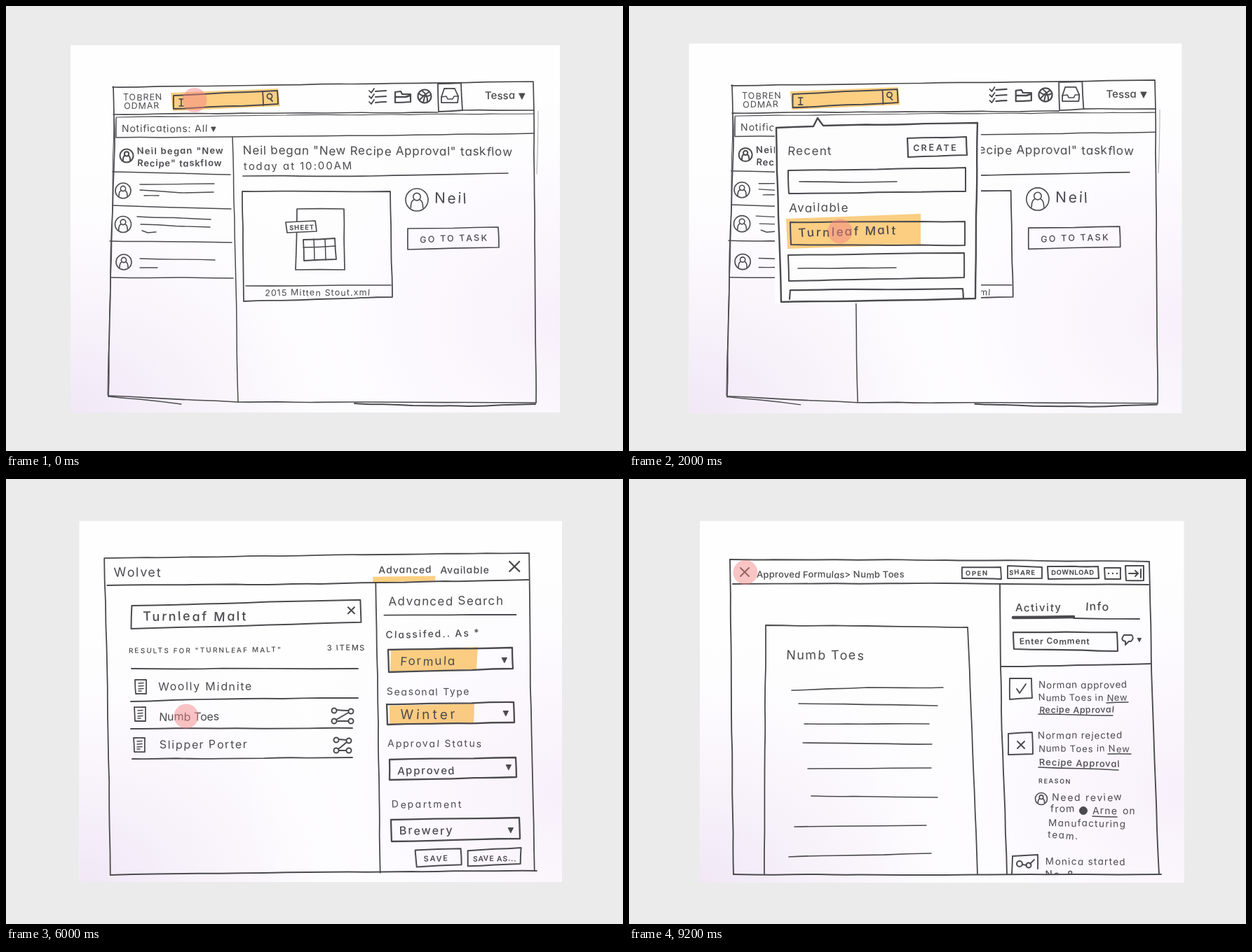
Recreate the animation shown at these times as an HTML page. Size 880 by 636 pixels, loop 10 s.

```html
<!DOCTYPE html>
<html lang="en">
<head>
<meta charset="utf-8">
<title>Paper prototype walkthrough</title>
<style>
  html, body { margin: 0; width: 100%; height: 100%; overflow: hidden; background: #ebebeb; }
  svg { display: block; width: 100vw; height: 100vh; }
  text { font-family: Inter, Lato, sans-serif; font-feature-settings: "cv11"; white-space: pre; }
  path { stroke-linecap: round; stroke-linejoin: round; }
</style>
</head>
<body>
<svg id="stage" viewBox="0 0 880 636" xmlns="http://www.w3.org/2000/svg"></svg>
<script>
const INK = '#4b4a4e';
const MARKER = '#fdd083';
const SCENE_MS = 2000;

let seed = 7;
const random = () => (seed = (seed * 16807) % 2147483647) / 2147483647;
const jitter = amount => (random() * 2 - 1) * amount;
const round = n => +n.toFixed(1);

// Hand-drawn stroke through "x y x y ..." with a slight tremble.
function pen(coords, width = 1.6, color = INK, fill = 'none') {
  const c = coords.split(' ').map(Number);
  let d = `M${c[0]} ${c[1]}`;
  for (let i = 2; i < c.length; i += 2) {
    const [x0, y0, x1, y1] = c.slice(i - 2, i + 2);
    const length = Math.hypot(x1 - x0, y1 - y0);
    const parts = Math.ceil(length / 70);
    const shake = Math.min(0.8, length / 50);
    for (let k = 1; k <= parts; k++) {
      const at = (f, j) => `${round(x0 + (x1 - x0) * f + jitter(j))} ${round(y0 + (y1 - y0) * f + jitter(j))}`;
      d += `Q${at((k - 0.5) / parts, shake)} ${at(k / parts, k < parts ? shake * 0.6 : 0)}`;
    }
  }
  return `<path d="${d}" fill="${fill}" stroke="${color}" stroke-width="${width}"/>`;
}

const box = (corners, width = 1.8, fill) =>
  pen(corners + ' ' + corners.split(' ').slice(0, 2).join(' '), width, INK, fill);

const curve = (d, width = 1.6, fill = 'none') =>
  `<path d="${d}" fill="${fill}" stroke="${INK}" stroke-width="${width}"/>`;

const ring = (x, y, r, width = 1.6, fill = 'none') =>
  `<circle cx="${x}" cy="${y}" r="${r}" fill="${fill}" stroke="${INK}" stroke-width="${width}"/>`;

// Lettering with baseline start x, y; each glyph tilts a little.
function write(x, y, words, size, spacing = 0, weight = 400, tilt = 0) {
  const tilts = [...words].map(() => round(jitter(4))).join(' ');
  const shifts = [];
  let last = 0;
  for (const _ of words) {
    const next = round(jitter(0.5));
    shifts.push(round(next - last));
    last = next;
  }
  return `<text x="${x}" y="${y}" dy="${shifts.join(' ')}" rotate="${tilts}" font-size="${size}" letter-spacing="${spacing}"
    font-weight="${weight}" fill="${INK}" transform="rotate(${tilt} ${x} ${y})">${words}</text>`;
}

const marker = points =>
  `<polygon points="${points}" fill="${MARKER}" style="mix-blend-mode:multiply"/>`;

const touch = (x, y) => `<circle cx="${x}" cy="${y}" r="17.5" fill="#f28383" opacity=".47"/>`;

const cross = (x, y, r, width = 2) =>
  pen(`${x - r} ${y - r} ${x + r} ${y + r}`, width) + pen(`${x + r} ${y - r} ${x - r} ${y + r}`, width);

const caret = (x, y, s = 4) => curve(`M${x - s} ${y - s}h${2 * s}l${-s} ${2 * s}z`, 1, INK);

const person = (x, y, r, width = 1.6) => {
  const k = r / 11;
  return ring(x, y, r, width) + ring(x, y - 3 * k, 3.6 * k, width) +
    curve(`M${x - 6 * k} ${y + 8 * k}q0 ${-7 * k} ${3 * k} ${-8 * k}m${6 * k} 0q${3 * k} ${k} ${3 * k} ${8 * k}`, width);
};

const page = (x, y) =>
  box(`${x - 8} ${y - 10} ${x + 8} ${y - 10} ${x + 8} ${y + 10} ${x - 7} ${y + 10}`, 1.8) +
  [-5, -1, 3].map(dy => pen(`${x - 3} ${y + dy} ${x + 4} ${y + dy - 0.5}`, 1.5)).join('') +
  pen(`${x - 3} ${y + 6} ${x + 1} ${y + 6}`, 1.5);

const flow = (x, y, w = 12) =>
  pen(`${x - w + 3} ${y - 8} ${x + w - 3} ${y - 7}`, 2) +
  pen(`${x + w - 2} ${y - 5} ${x - w + 3} ${y + 6}`, 2) +
  pen(`${x - w + 3} ${y + 8} ${x + w - 3} ${y + 8}`, 2) +
  [[-w, -7], [w, -6], [-w, 8], [w, 8]].map(([dx, dy]) => ring(x + dx, y + dy, 3.5, 2, '#fcfbfe')).join('');

const paper = (x0, y0, x1, y1) => {
  const rect = fill => `<rect x="${x0}" y="${y0}" width="${x1 - x0}" height="${y1 - y0}" fill="${fill}"/>`;
  return rect('#fefefe') + rect('url(#lavender)') + rect('url(#blush)');
};

function headerIcons() {
  const checks = [121, 129, 137].map(y =>
    pen(`518 ${y} 521 ${y + 3} 525 ${y - 3}`, 1.8) + pen(`527 ${y + 1} 542 ${y}`, 2.2)).join('');
  const folder = box('555 138 555 123 563 122 565 126 577 126 577 137', 2.2) + pen('556 130 570 130 576 128', 2.4);
  const globe = ring(597, 129, 9.5, 2.2) +
    curve('M589 125q8 7 17 2M593 121q9 6 8 16M590 134q6 -7 13 -11M597 130l-2 8', 2);
  const tray = box('616 111 649 110 651 149 617 151', 1.8) +
    box('621 130 625 118 640 118 645 129 644 138 621 138', 1.8) + pen('621 130 628 129 630 133 637 133 639 129 645 129', 1.6);
  return checks + folder + globe + tray;
}

function inbox() {
  const frame = pen('152 116 752 108 753 152 754 330 756 567', 1.7) +
    pen('153 115 155 200 149 380 146 558', 1.7) + pen('154 160 151 330 145 556', 1) +
    pen('146 557 330 566 500 566 756 567', 1.6) + pen('146 558 190 562 250 569', 1.3) +
    pen('497 568 580 571 660 572 755 569', 2) + pen('759 150 757 240', 0.8, '#999') +
    pen('153 155 400 153 616 152', 1.6) + pen('651 149 753 149', 1.6) +
    pen('157 160 157 188 420 186 753 182', 1.5) + pen('157 159 400 156 752 154', 1.1);
  const header = write(167, 135, 'TOBREN', 12.5, 1, 400, -1) + write(168, 147, 'ODMAR', 12.5, 1) +
    marker('235,124 388,118 391,143 238,150') +
    box('239 128 387 121 388 140 239 147', 2) + pen('366 122 367 142', 1.8) +
    ring(376, 129, 3.6, 1.7) + pen('377 133 380 136', 1.8) +
    pen('247 133 253 133', 1.7) + pen('250 133 250 143', 1.7) + pen('247 143 253 143', 1.7) +
    headerIcons() + write(683, 133, 'Tessa', 15, 0, 500) + caret(736, 129);
  const scribbles = ['191 255 297 254', '191 263 250 267 296 266', '197 271 218 271',
    '187 301 292 305', '192 312 291 316', '194 321 202 324 214 323',
    '191 361 298 363', '191 374 216 374'].map(s => pen(s, 1.4)).join('');
  const dividers = ['152 237 320 241', '152 285 321 290', '148 336 322 338', '150 388 324 389', '323 187 327 360 331 566']
    .map(s => pen(s, 1.5)).join('');
  const sidebar = write(165, 180, 'Notifications: All', 14, 0.8) + caret(296, 176, 3) +
    write(187, 212, 'Neil began "New', 13, 1.2, 600, -0.5) + write(187, 229, 'Recipe" taskflow', 13, 0.9, 600) +
    person(172, 214, 9.5, 2) + person(167, 264, 11) + person(167, 312, 11.5) + person(168, 366, 11) +
    scribbles + dividers;
  const detail = write(338, 212, 'Neil began "New Recipe Approval" taskflow', 17, 0.75, 400, 0.3) +
    write(339, 234, 'today at 10:00AM', 15, 1.9) + pen('338 243 520 243 716 239', 1.7) +
    box('337 265 548 265 551 416 339 422', 1.8) + pen('342 400 549 399', 1.6) +
    box('415 290 482 290 483 377 413 377', 1.7) +
    box('399 309 441 307 443 322 401 324', 1.7, '#fdfdfe') + write(404, 320, 'SHEET', 9.5, 1, 700) +
    box('424 334 469 332 471 362 425 364', 1.8) + pen('424 345 470 343', 1.5) +
    pen('439 333 440 363', 1.5) + pen('455 333 456 363', 1.5) +
    write(369, 414, '2015 Mitten Stout.xml', 12.5, 1.1) +
    person(586, 277, 16) + write(611, 282, 'Neil', 21, 2.5) +
    box('573 318 702 316 703 345 573 348', 1.7) + write(590, 338, 'GO TO TASK', 12.5, 2.3, 500, -1.5);
  return paper(92, 56, 790, 581) + frame + header + sidebar + detail;
}

function popup() {
  return `<path d="M204 180L210 161H502V425H208V180Z" fill="#fdfdfe"/>` +
    pen('210 174 263 172 269 160 277 171 400 169 497 167 495 300 494 418 350 421 217 423 213 300 210 174', 2.4) +
    write(226, 213, 'Recent', 17, 1.4) +
    box('397 189 481 187 482 213 398 216', 2.2) + write(405, 207, 'CREATE', 12.5, 2.6, 600) +
    box('227 235 480 231 480 265 228 268', 2) + pen('243 251 330 252 382 251', 1.6) +
    write(228, 294, 'Available', 17, 1.4) +
    marker('224,304 416,297 416,341 226,347') +
    box('230 309 479 308 479 342 231 341', 2) + write(242, 330, 'Turnleaf Malt', 17, 2.4, 500, -1.5) +
    box('227 356 478 353 478 388 228 393', 2) + pen('241 375 381 374', 1.6) +
    pen('229 419 230 406 476 404 477 418', 2.2);
}

function searchShell() {
  return pen('142 113 450 110 748 108 749 300 754 562', 1.8) + pen('142 114 146 300 149 565', 1.8) +
    pen('149 566 400 563 757 562', 2) + pen('146 152 450 151 747 146', 2) + pen('529 150 532 350 534 564', 1.8) +
    write(156, 140, 'Wolvet', 18, 1.6) +
    write(533, 136, 'Advanced', 14, 1, 500) + write(621, 137, 'Available', 14, 1, 500) + cross(727, 127, 7, 2.3) +
    marker('525,141 614,140 614,147 525,149') +
    box('181 181 507 174 508 206 180 214', 2) + write(197, 203, 'Turnleaf Malt', 18, 2.6, 500) + cross(494, 189, 4.5) +
    write(547, 182, 'Advanced Search', 17, 1.4) + pen('541 196 729 196', 1.8) +
    write(543, 229, 'Classifed.. As *', 14, 2, 500, -1) +
    box('584 532 649 530 650 553 586 556', 2) + write(596, 548, 'SAVE', 11, 1.8, 600) +
    box('659 533 735 529 734 552 659 555', 2) + write(666, 548, 'SAVE AS...', 10.5, 0.8, 600);
}

const select = (corners, caretX, caretY) => box(corners, 2.3) + caret(caretX, caretY, 3.5);

function allResults() {
  const rows = [
    [218, 295, 'Tinpan Ale', 2.2],
    [218, 335, 'Narrow Plank Rye', 0.7],
    [218, 379, 'Gooseplum Rise Stout', 0.6],
    [218, 420, 'Barrowmoots', 0.8],
    [222, 468, 'Thimble Turnip Malt', 1.8],
    [219, 512, 'Lantern Smokemalt', 1.4]
  ];
  const rules = ['193 269 499 269', '179 308 494 308', '180 347 495 350', '175 391 498 391',
    '180 433 493 433', '180 479 494 480', '176 526 340 523 496 524'];
  return paper(106, 60, 794, 576) + searchShell() +
    write(187, 247, 'RESULTS FOR', 11, 2.4, 500) + write(300, 245, '"Turnleaf Malt"', 14, 2.4) +
    write(456, 244, '1000', 11, 1.2, 600) + write(457, 257, 'items', 12.5, 1.8, 500) +
    rules.map(r => pen(r, 1.9)).join('') +
    rows.map(([x, y, name, gap]) => page(197, y - 6) + write(x, y, name, 16, gap)).join('') +
    flow(472, 333) + flow(471, 460, 13) + flow(471, 506, 10) +
    select('546 249 722 244 723 275 547 281', 712, 262) + write(558, 270, 'Select...', 16, 2.2, 500) +
    touch(599, 266);
}

function filteredResults() {
  const rules = ['179 271 502 271', '178 318 340 314 502 313', '178 357 494 356', '180 400 494 398'];
  return paper(104.5, 60, 793, 576) +
    `<g transform="rotate(-.2 150 350) translate(-1 0)">${searchShell()}</g>` +
    write(175, 249, 'RESULTS FOR "TURNLEAF MALT"', 10, 2.1, 500, -0.4) + write(458, 245, '3 ITEMS', 11, 1.6, 500) +
    rules.map(r => pen(r, 1.9)).join('') +
    page(192, 297) + write(217, 302, 'Woolly Midnite', 16, 1.7) +
    page(191, 336) + write(218, 345, 'Numb Toes', 16, 0) + flow(480, 338) +
    page(190, 380) + write(219, 385, 'Slipper Porter', 16, 1.6) + flow(480, 380, 9) +
    marker('549,245 673,240 671,272 548,275') + select('545 244 722 241 723 271 546 276', 711, 259) +
    write(562, 266, 'Formula', 17, 2.1) +
    write(543, 309, 'Seasonal Type', 14, 1.6) +
    marker('547,324 668,321 667,350 547,351') + select('543 322 724 319 725 348 544 351', 713, 335) +
    write(562, 343, 'Winter', 19, 4) +
    write(544, 383, 'Approval Status', 14, 2) +
    select('547 401 727 398 728 426 547 430', 717, 412) + write(558, 422, 'Approved', 15, 1.7, 500) +
    write(550, 470, 'Department', 14, 2.3) +
    select('549 487 732 484 733 514 550 518', 720, 502) + write(561, 508, 'Brewery', 16, 2, 500) +
    touch(257, 339);
}

function documentView() {
  const frame = pen('144 115 450 116 742 118 746 300 756 565', 1.9) + pen('144 115 146 330 149 565', 1.9) +
    pen('149 565 450 566 759 565', 2) + pen('148 150 450 149 741 151', 1.9) + pen('529 150 531 330 539 565', 1.9);
  const toolbar = cross(165, 133, 6, 2) + write(182, 141, 'Approved Formulas> Numb Toes', 13, 0.2, 500) +
    box('475 126 530 126 531 143 475 142', 1.9) + write(480, 138, 'OPEN', 9.5, 1.6, 700) +
    box('540 124 589 126 589 142 540 142', 1.9) + write(542, 137, 'SHARE', 9.5, 1.2, 700) +
    box('597 125 669 125 670 142 598 143', 2.1) + write(602, 137, 'DOWNLOAD', 9.5, 0.6, 700) +
    box('678 127 701 127 701 143 679 143', 2) + [684, 690, 696].map(x => ring(x, 135, 0.6, 1.2, INK)).join('') +
    box('708 124 734 124 734 145 709 145', 2) + pen('713 135 726 135', 2) + pen('722 131 726 135 722 139', 2) +
    pen('730 129 730 141', 2);
  const lines = ['232 302 340 298 448 298', '242 321 440 324', '250 350 428 350', '248 377 432 379',
    '255 414 431 413', '260 453 440 455', '236 497 424 495', '228 540 431 535'];
  const sheet = pen('193 565 195 209 340 210 483 212 497 565', 1.8) +
    write(224, 258, 'Numb Toes', 18, 1.7) + lines.map(l => pen(l, 1.6)).join('');
  const panel = write(551, 189, 'Activity', 15, 1.5, 500) + write(651, 188, 'Info', 16, 1.3, 500) +
    pen('548 198 634 197', 4.5) + pen('634 199 728 200', 1.8) +
    box('548 219 696 219 697 246 549 243', 2.1) + write(557, 236, 'Enter Comment', 12, 0.8, 600) +
    curve('M706 223h11q4 5 -1 9h-3l-5 5v-5q-8 -1 -2 -9z', 2) + caret(728, 230, 2.5) +
    pen('530 268 640 266 745 264', 1.9);
  const approved = box('543 285 574 285 575 313 543 315', 1.9) + pen('553 300 557 306 566 293', 1.9) +
    write(584, 299, 'Norman approved', 13.5, 0.7) + write(584, 317, 'Numb Toes in New', 13, 0.7) +
    pen('681 320 712 319', 1.5) + write(585, 334, 'Recipe Approval', 12.5, 0.6, 500) + pen('584 336 690 338', 1.6);
  const rejected = box('541 364 575 362 576 393 541 394', 1.9) + cross(559, 380, 5, 1.9) +
    write(583, 371, 'Norman rejected', 13.5, 0.9) + write(584, 390, 'Numb Toes in New', 13, 0.9) +
    pen('683 393 716 393', 1.5) + write(585, 409, 'Recipe Approval', 13, 0.9, 500, 1.5) + pen('584 412 698 416', 1.6) +
    write(584, 435, 'REASON', 9, 1.6, 600) +
    person(588, 457, 8.5) + write(603, 460, 'Need review', 14, 1.7) +
    write(601, 476, 'from', 14, 1.2) + ring(648, 474, 5.5, 1, INK) +
    write(661, 479, 'Arne', 14, 1.1) + pen('661 482 696 483', 1.5) + write(704, 479, 'on', 14, 0.8) +
    write(598, 496, 'Manufacturing', 13.5, 1.3, 400, 1) + write(597, 513, 'team.', 13.5, 1.7, 400, 3);
  const started = `<g clip-path="url(#fold)">` +
    pen('546 565 547 539 583 537 583 557', 1.9) + ring(557, 550, 4, 2) + ring(570, 552, 3.5, 2) +
    pen('561 551 567 552', 1.8) + pen('572 550 578 544', 1.8) +
    write(594, 551, 'Monica started', 13.5, 1.3, 400, 0.5) + write(594, 570, 'No. 8', 13.5, 1.4, 500) + `</g>`;
  return paper(101, 60, 791.5, 577) + frame + toolbar + sheet + panel + approved + rejected + started + touch(166, 133.5);
}

const defs = `<defs>
  <radialGradient id="lavender" cx="0" cy="1" r=".75">
    <stop offset="0" stop-color="#f1e7f6"/><stop offset=".45" stop-color="#f8f3fb" stop-opacity=".8"/>
    <stop offset="1" stop-color="#fff" stop-opacity="0"/>
  </radialGradient>
  <radialGradient id="blush" cx="1.02" cy=".75" r=".7">
    <stop offset="0" stop-color="#f8effa"/><stop offset=".5" stop-color="#fbf8fe" stop-opacity=".8"/>
    <stop offset="1" stop-color="#fff" stop-opacity="0"/>
  </radialGradient>
  <clipPath id="fold"><rect x="530" y="530" width="230" height="36"/></clipPath>
</defs>`;

const inboxArt = inbox();
const scenes = [
  inboxArt + touch(269, 134.5),
  `<g transform="translate(-7 -2.8) scale(1.0067 1.0063)">${inboxArt}</g>` + popup() + touch(301, 322),
  allResults(),
  filteredResults(),
  documentView()
];

const stage = document.getElementById('stage');
stage.innerHTML = defs + '<rect width="880" height="636" fill="#ebebeb"/>' +
  scenes.map(art => `<g class="scene" display="none">${art}</g>`).join('');
const layers = [...stage.querySelectorAll('.scene')];

function render(ms) {
  const current = Math.floor(ms / SCENE_MS) % layers.length;
  layers.forEach((layer, i) => layer.setAttribute('display', i === current ? 'inline' : 'none'));
}

const start = performance.now();
function tick() {
  render(performance.now() - start);
  requestAnimationFrame(tick);
}
tick();
</script>
</body>
</html>
```
